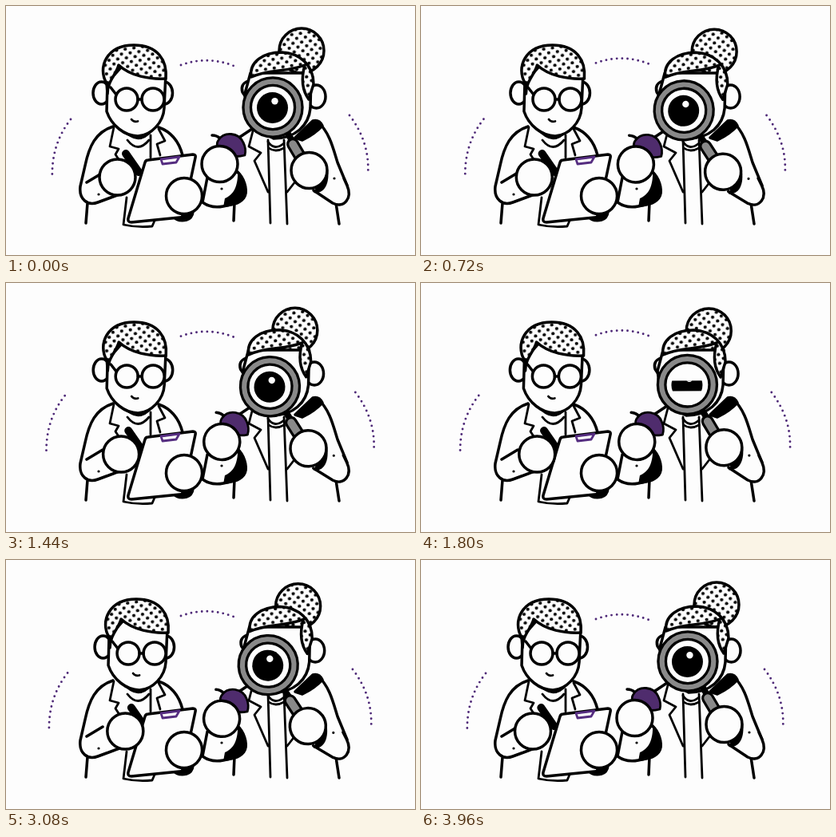
Animation, 512 px wide and 312 px high, one loop 4 s. Source, as an HTML page:

```html
<!DOCTYPE html>
<html lang="en">
<head>
<meta charset="utf-8">
<title>Two scientists</title>
<style>
  html, body { margin: 0; width: 100%; height: 100%; overflow: hidden; background: #fdfdfd; }
  svg { display: block; width: 100vw; height: 100vh; }
  .ink { fill: none; stroke: #000; stroke-width: 3.5; stroke-linecap: round; stroke-linejoin: round; }
  .thin { stroke-width: 2.8; }
  .w { fill: #fdfdfd; }
  .b { fill: #000; }
  .solid { fill: #000; stroke: none; }
  .plum { fill: #4f2c6d; }
  .clip { stroke: #552d80; }
  .dots { fill: none; stroke: #4f2a78; stroke-width: 2.9; stroke-linecap: round; stroke-dasharray: 0 6.7; }
</style>
</head>
<body>
<svg viewBox="0 0 512 312">
  <defs>
    <pattern id="spots" width="11" height="11" patternUnits="userSpaceOnUse" patternTransform="rotate(-8)">
      <rect width="11" height="11" fill="#fdfdfd"/>
      <circle cx="2.75" cy="2.75" r="2.1"/><circle cx="8.25" cy="8.25" r="2.1"/>
    </pattern>
    <clipPath id="lids"><rect id="gap" x="310" width="48"/></clipPath>
  </defs>

  <path id="arcLeft" class="dots" d="M81 142Q56 174 58 217"/>
  <path id="arcTop" class="dots" d="M219 74Q252 62 285 75"/>
  <path id="arcRight" class="dots" d="M430 137Q456 171 453 212"/>

  <g class="ink">
    <!-- left body -->
    <path class="w" stroke="none" d="M134 151C112 158 104 176 99 200L93 226L102 246L150 270L222 260V186Q212 158 191 152Z"/>
    <path d="M134 151C112 158 104 176 99 200L93 226C91 242 102 251 115 246L142 236M102 247L100 272M191 152Q214 160 221 187M101 221L121 209"/>
    <path class="thin" d="M135 152L130 176L141 179L137 186L150 206M181 162V190M191 154L199 169L189 173L193 187"/>
    <path class="thin" d="M152 168Q165 185 179 168M151 240L147 274Q165 278 183 276L186 269"/>
    <path class="b" d="M148 155Q165 176 183 155Z"/>
    <circle class="solid" cx="116" cy="236" r="1.6"/>

    <!-- left head -->
    <g id="headLeft">
      <ellipse class="w" cx="119.500" cy="109" rx="10.500" ry="14"/>
      <ellipse class="w" cx="198" cy="109" rx="10.500" ry="14"/>
      <path class="w" d="M127 96L126 132C132 150 149 163 165 163C182 162 197 146 198 128L200 84L150 70Z"/>
      <circle class="w" cx="151" cy="117" r="14"/>
      <circle class="w" cx="184" cy="117" r="14"/>
      <path d="M165 117H170M138 111L131 102"/>
      <path class="thin" d="M157 142Q160 146 165 144.500"/>
    </g>
    <path id="hairLeft" fill="url(#spots)" d="M127 110L126 97C114 77 126 49 160 49C190 49 202 68 200 91C180 92 156 88 141 74C138 86 127 94 127 110Z"/>

    <!-- right body -->
    <path class="w" stroke="none" d="M290 166L311 152H390Q408 160 415 198L417 272H285V245Z"/>
    <path d="M290 166L311 152M286 246L285 269M391 146C405 158 410 180 415 196L427 225M413 247L417 273"/>
    <path class="thin" d="M310 153L304 176L319 184L311 194L328 233M328 168L331 272M348 168L352 273M366 215L352 233"/>
    <path class="thin" d="M328 170Q336 182 348 172M329 178Q337 184 348 178"/>
    <path class="b" d="M362 165L384 144Q392 142 396 150Q387 160 371 168Z"/>

    <!-- right head -->
    <circle id="bun" fill="url(#spots)" cx="370" cy="56" r="28"/>
    <g id="headRight">
      <ellipse class="w" cx="388.500" cy="113.500" rx="11.500" ry="14.500"/>
      <path class="w" d="M303 94Q293 98 296 108L300 114"/>
      <path class="w" d="M306 84L299 110Q302 150 335 166C362 166 379 150 381 128L382 84Z"/>
    </g>
    <g id="hairRight" fill="url(#spots)">
      <path d="M307 89C304 70 322 58 345 58C368 59 385 74 385 98L379 117C371 106 369 92 374 74C352 83 328 79 307 89Z"/>
    </g>

    <!-- writing hand, pen and clipboard -->
    <path id="pen" style="stroke-width:10" d="M150 185L166 208"/>
    <path class="b" d="M207 262Q215 271 226 268Q233 266 234 258Z"/>
    <path class="w" d="M178 193L234 186Q238 186 237 190L222 261Q221 265 217 265L157 271Q152 271 153 266L174 196Q175 193 178 193Z"/>
    <path class="thin clip" d="M194 192L196 198L213 196L217 189Z"/>
    <circle id="writer" class="w" cx="139.500" cy="214.500" r="22.500"/>

    <!-- sleeve and hand with fruit -->
    <path class="w" d="M252 215L246 246Q257 254 272 251Q300 246 300 232Q298 217 290 208Z"/>
    <path class="solid" d="M290 206C300 214 304 229 301 238C297 248 286 251 272 252L274 241C284 237 291 227 290 206Z"/>
    <circle class="solid" cx="270" cy="229" r="1.6"/>
    <g id="fruit">
      <path d="M258 162Q264 162 268 166"/>
      <path class="thin plum" d="M266 168C273 157 291 158 297 171Q301 179 299 187Q288 190 278 187L265 178Q263 172 266 168Z"/>
      <circle class="w" cx="267.500" cy="198" r="22.500"/>
    </g>
    <circle class="w" cx="223" cy="238" r="22.500"/>

    <!-- forearm with magnifier -->
    <g id="lens">
      <path class="w" d="M423 216L427 225C434 241 423 254 409 247L385 231"/>
      <path class="solid" d="M385 234C399 236 407 221 402 198Z"/>
      <circle class="solid" cx="411" cy="216" r="1.6"/>
      <path style="stroke-width:8" d="M350 155L360 172"/>
      <path style="stroke-width:16" d="M359 173L372 195"/>
      <path style="stroke-width:9.500;stroke:#898989" d="M359 173L372 195"/>
      <circle class="w" cx="334" cy="127" r="32.300" style="stroke-width:12.800"/>
      <circle cx="334" cy="127" r="32.300" style="stroke:#898989;stroke-width:6.200"/>
      <g clip-path="url(#lids)" stroke="none">
        <circle class="solid" cx="333.500" cy="127.500" r="19.500"/>
        <circle class="w" cx="336.500" cy="119.300" r="4.200"/>
      </g>
      <circle class="w" cx="379.500" cy="206" r="22.500"/>
    </g>
  </g>
</svg>
<script>
const LOOP = 4000, STEP = 40;
const part = id => document.getElementById(id);
const move = (id, x, y = 0) => part(id).setAttribute("transform", `translate(${x} ${y})`);
const turn = (id, angle, x, y) => part(id).setAttribute("transform", `rotate(${angle} ${x} ${y})`);

// Swings 0 -> 1 -> 0 the given number of times per loop.
const swing = (t, times) => (1 - Math.cos(2 * Math.PI * times * t / LOOP)) / 2;
const smooth = k => (1 - Math.cos(Math.PI * k)) / 2;

// Interpolates a table of [time, value] steps.
function track(t, steps, ease = k => k) {
  const i = steps.findIndex(([time]) => time > t);
  const [t0, v0] = steps[i - 1], [t1, v1] = steps[i];
  return v0 + (v1 - v0) * ease((t - t0) / (t1 - t0));
}

const WRITE = [[0, 0], [3200, 10.2], [4000, 0]];
const LIFT = [[0, 0], [1440, 1], [2900, 1], [4000, 0]];
const OPEN = [[0, 22], [1560, 22], [1800, 6.5], [2300, 6.5], [2400, 11.5], [2580, 22], [4000, 22]];

function draw(t) {
  const slow = swing(t, 1), look = swing(t, 3), inspect = swing(t, 2);
  move("arcLeft", -9 * slow, -slow);
  move("arcTop", 0, -9 * slow);
  move("arcRight", 9 * slow);

  move("headLeft", 3 * look);
  move("hairLeft", 4.5 * look);
  move("bun", -10 * slow, 4 * slow);
  move("headRight", -3 * slow);
  move("hairRight", -4 * slow, slow);

  const write = track(t, WRITE);
  move("pen", write * 0.7);
  move("writer", write);
  turn("fruit", 3.8 * track(t, LIFT, smooth), 255, 240);
  turn("lens", -3.1 * inspect, 418, 238);

  const open = track(t, OPEN);
  part("gap").setAttribute("y", 128.5 - open);
  part("gap").setAttribute("height", 2 * open);
}

const start = performance.now();
function tick() {
  const t = (performance.now() - start) % LOOP;
  draw(Math.floor(t / STEP) * STEP);
  requestAnimationFrame(tick);
}
tick();
</script>
</body>
</html>
```
